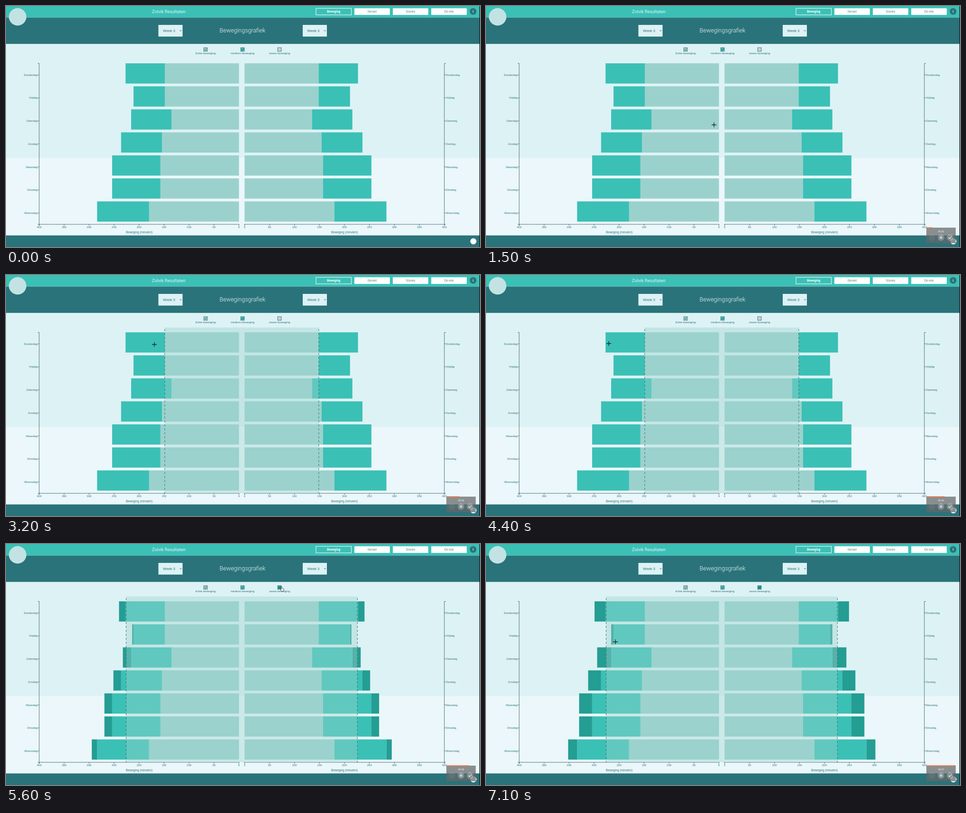
These frames come from a looping animation (1000 px wide and 510 px high, 7200 ms). An HTML page:

```html
<!DOCTYPE html>
<html lang="nl">
<head>
<meta charset="utf-8">
<title>Bewegingsgrafiek</title>
<style>
html, body { margin: 0; width: 100%; height: 100%; overflow: hidden; background: #ebf7fa; }
svg { display: block; width: 1000px; height: 510px; }
text { font-family: "Liberation Sans", Arial, sans-serif; fill: #2a737a; }
.ui { font-family: Roboto, sans-serif; }
</style>
</head>
<body>
<svg id="stage" viewBox="0 0 1000 510" xmlns="http://www.w3.org/2000/svg"></svg>
<script>
const LOOP = 7200, STEP = 100;
const DARK = '#2a737a', TEAL = '#3bc0b6', LIGHT = '#9bd1cc', HEAVY = '#249d93', PALE = '#ddf2f5', LINE = '#3f6468';
const LEFT = 491.5, RIGHT = 503.3, UNIT = 421.5 / 400;
const TOP = 121.3, BOTTOM = 462, ROW = 48.7;

// day, then outer edge in pixels of each stacked part
const days = [
  ['Donderdag', 156.3, 239.3, 262.5],
  ['Vrijdag', 156.3, 222.5, 227.5],
  ['Zaterdag', 142.5, 227.5, 257],
  ['Zondag', 162.5, 248.7, 276],
  ['Maandag', 165.7, 267.6, 295],
  ['Dinsdag', 165.7, 267.6, 295],
  ['Woensdag', 189.7, 299.3, 318.2]
];

// time, x, y
const path = [
  [100, 597, 349], [700, 595, 347], [1100, 590, 341], [1900, 372, 162],
  [2400, 341, 144], [2800, 338, 145], [3200, 313, 147], [4400, 259, 145],
  [4700, 258, 145], [5100, 577, 94], [5600, 582, 95], [6100, 582, 95],
  [6800, 286, 203], [7100, 273, 207]
];
const FIRST_CLICK = 2800, SECOND_CLICK = 4700, CHECK_CLICK = 5200, GROW = 750;

const stage = document.getElementById('stage');

function add(tag, attrs, parent = stage) {
  const el = document.createElementNS('http://www.w3.org/2000/svg', tag);
  for (const key in attrs) el.setAttribute(key, attrs[key]);
  parent.appendChild(el);
  return el;
}
const rect = (x, y, width, height, fill, parent, more) =>
  add('rect', { x, y, width, height, fill, ...more }, parent);
const stroke = (d, color, width = 1, parent, more) =>
  add('path', { d, fill: 'none', stroke: color, 'stroke-width': width, ...more }, parent);
const circle = (cx, cy, r, fill, parent) => add('circle', { cx, cy, r, fill }, parent);
function label(str, x, y, size, anchor = 'middle', more, parent) {
  const el = add('text', { x, y, 'font-size': size, 'text-anchor': anchor, ...more }, parent);
  el.textContent = str;
  return el;
}
const show = (el, on) => el.setAttribute('visibility', on ? 'visible' : 'hidden');

function drawPage() {
  rect(0, 0, 1000, 510, '#ebf7fa');
  rect(0, 80, 1000, 241.5, PALE);
  rect(0, 0, 1000, 24.5, TEAL);
  rect(0, 24.5, 1000, 55.7, DARK);
  rect(0, 485.5, 1000, 24.5, DARK);
  circle(24.5, 23, 18.5, '#c3e2e3');
  circle(986, 498, 6.5, '#fff');

  label('Zolvik Resultaten', 308, 15.3, 9.3, 'start', { class: 'ui', style: 'fill:#e6f7f7' });
  label('Bewegingsgrafiek', 499, 56.3, 12.5, 'middle', { class: 'ui', 'font-weight': 300, style: 'fill:#f2fafa' });

  ['Beweging', 'Gevoel', 'Scores', 'De reis'].forEach((name, i) => {
    const x = 654 + i * 81.1, on = i === 0;
    rect(x, 5, 74.6, 13.8, on ? TEAL : '#fff', stage, { stroke: '#fff', 'stroke-width': on ? 1 : .4 });
    label(name, x + 37.3, 14.1, 6.4, 'middle',
      { class: 'ui', 'font-weight': on ? 700 : 400, style: `fill:${on ? '#fff' : '#4e8085'}` });
  });
  circle(985.5, 11.5, 7, DARK);
  label('i', 985.5, 14, 7, 'middle', { class: 'ui', 'font-weight': 700, style: 'fill:#fff' });

  for (const x of [321.5, 626]) {
    rect(x, 40, 51, 24.7, PALE);
    label('Week 3', x + 9.5, 55.2, 8, 'start', { class: 'ui' });
    stroke(`M${x + 45.2} 51.4l1.8 1.8l1.8-1.8`, '#24494d', 1);
  }
}

function drawCheck(x, name, fill, checked) {
  label(name, x, 102.2, 6.2);
  const box = rect(x - 3.8, 88.2, 7.6, 7.6, fill, stage, { stroke: '#4d7478', 'stroke-width': 1 });
  if (checked) stroke(`M${x - 2.2} 92.2l1.7 1.8l3-4`, '#285f64', 1);
  return box;
}

function drawAxes() {
  for (const side of [-1, 1]) {
    const zero = side < 0 ? LEFT : RIGHT, end = zero + side * 400 * UNIT;
    stroke(`M${end + side * 3} ${TOP + .2}H${end}V${BOTTOM}H${end + side * 3}`, LINE, .9);
    stroke(`M${end} ${BOTTOM + 3}V${BOTTOM}H${zero}V${BOTTOM + 3}`, LINE, .9);
    for (let v = 0; v <= 400; v += 50) {
      const x = zero + side * v * UNIT;
      stroke(`M${x} ${BOTTOM}v3`, LINE, .9);
      label(v, x, 470, 6);
    }
    days.forEach(([name], i) => {
      const y = TOP + ROW * (i + .5);
      stroke(`M${end} ${y}h${side * 3}`, LINE, .9);
      label(name, end + side * 3.4, y + 2.1, 5.9, side < 0 ? 'end' : 'start');
    });
    label('Beweging (minuten)', side < 0 ? 281 : 714, 481.4, 6.3);
  }
}

function drawBars() {
  const heavy = [];
  days.forEach(([, light, medium, full], i) => {
    const y = TOP + i * ROW;
    for (const side of [-1, 1]) {
      const bar = (from, to, fill) =>
        rect(side < 0 ? LEFT - to : RIGHT + from, y, to - from, 42.8, fill);
      bar(0, light, LIGHT);
      bar(light, medium, TEAL);
      heavy.push({ el: bar(medium, medium, HEAVY), side, medium, full });
    }
  });
  return heavy;
}

function drawBand(reach) {
  const g = add('g', {}), a = LEFT - reach, b = RIGHT + reach;
  rect(a, 111, b - a, BOTTOM - 111, LIGHT, g, { opacity: .4 });
  stroke(`M${a} 114.5V${BOTTOM}M${b} 114.5V${BOTTOM}`, '#3f6a6c', 1, g, { 'stroke-dasharray': '4.2 4.2' });
  return g;
}

function drawRecorder() {
  const g = add('g', {});
  rect(929, 469, 62, 33, '#646769', g, { opacity: .72 });
  const bar = rect(929, 468.3, 0, 1.9, '#ee7447', g);
  const clock = label('00:00', 960, 478.8, 5, 'middle', { style: 'fill:#fff' }, g);
  for (const x of [941, 960, 979]) add('circle', { cx: x, cy: 490, r: 7, fill: '#fff', opacity: x > 950 ? .24 : .06 }, g);
  stroke('M938.5 487.5l5 5m0-5l-5 5', '#4e7b7d', 1, g);
  stroke('M958.6 487.5v5m2.8-5v5', '#fff', 1.4, g);
  stroke('M976 490l2.2 2.3l4-4.6', '#fff', 1.2, g);
  return { g, bar, clock };
}

drawPage();
drawCheck(421, 'lichte beweging', LIGHT, true);
drawCheck(499, 'medium beweging', TEAL, true);
const heavyBox = drawCheck(577, 'zware beweging', '#c3d6d8', false);
const heavyTick = stroke('M574.8 92.2l1.7 1.8l3-4', '#1b686a', 1);
drawAxes();
const heavyBars = drawBars();
const bands = [drawBand(156.6), drawBand(238)];
const recorder = drawRecorder();
const cross = stroke('M-5 0H5M0-5V5', '#16282a', 1.3);
const hand = add('path', {
  d: 'M-1.5-4.2q.9-1 1.8 0v3l3.3.8q1 .5.8 1.8l-.7 3.6h-4.4l-2.5-3.3q.1-1.2 1.7-.5z',
  fill: '#fff', stroke: '#222', 'stroke-width': .8
});
rect(998.8, 0, 1.2, 510, '#10191b');

function pointAt(t) {
  let i = 0;
  while (i < path.length - 2 && t > path[i + 1][0]) i++;
  const [t0, x0, y0] = path[i], [t1, x1, y1] = path[i + 1];
  const p = Math.max(0, Math.min(1, (t - t0) / (t1 - t0)));
  const e = p * p * (3 - 2 * p);
  return [x0 + (x1 - x0) * e, y0 + (y1 - y0) * e];
}
const cubic = p => p < .5 ? 4 * p ** 3 : 1 - 4 * (1 - p) ** 3;

function render(t) {
  const live = t >= STEP;
  const [x, y] = pointAt(t);
  const overBox = Math.abs(x - 579) < 9 && y < 106;
  for (const el of [cross, hand]) el.setAttribute('transform', `translate(${x} ${y})`);
  show(cross, live && !overBox);
  show(hand, live && overBox);

  show(bands[0], t >= FIRST_CLICK && t < SECOND_CLICK);
  show(bands[1], t >= SECOND_CLICK);

  const checked = t >= CHECK_CLICK;
  heavyBox.setAttribute('fill', checked ? HEAVY : '#c3d6d8');
  show(heavyTick, checked);
  const grow = cubic(Math.max(0, Math.min(1, (t - CHECK_CLICK) / GROW)));
  for (const { el, side, medium, full } of heavyBars) {
    const w = (full - medium) * grow;
    el.setAttribute('width', w);
    if (side < 0) el.setAttribute('x', LEFT - medium - w);
  }

  show(recorder.g, live);
  recorder.bar.setAttribute('width', 62 * Math.min(1, t / 7100));
  recorder.clock.textContent = '00:0' + Math.floor(t / 1000);
}

const start = performance.now();
function tick() {
  const t = (performance.now() - start) % LOOP;
  render(Math.floor(t / STEP) * STEP);
  requestAnimationFrame(tick);
}
tick();
</script>
</body>
</html>
```
